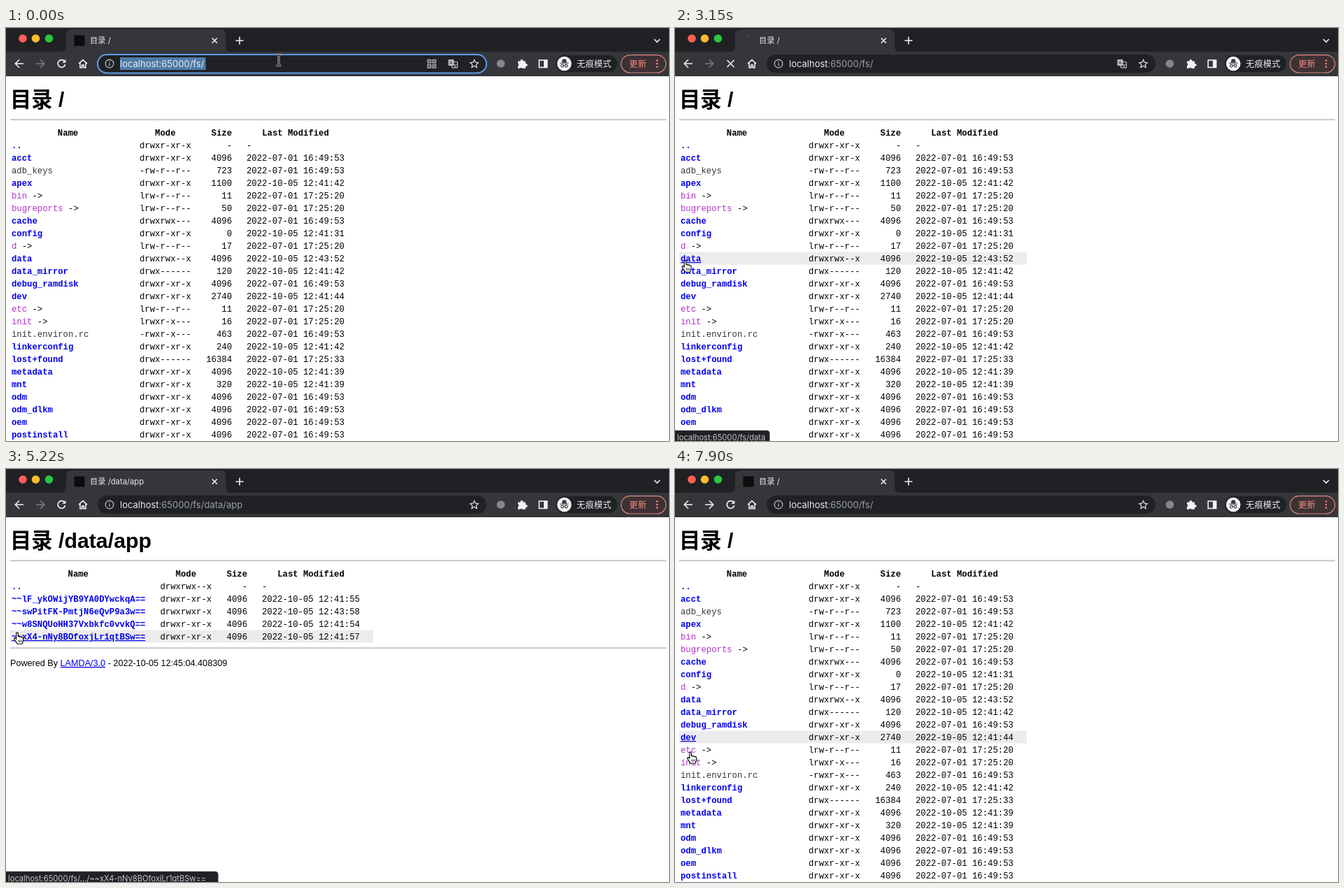
Animation of 948x591 px, one loop 8 s. Source, as an HTML page:

```html
<!DOCTYPE html>
<html lang="zh-CN">
<head>
<meta charset="utf-8">
<title>目录</title>
<style>
html, body { margin: 0; width: 100%; height: 100%; overflow: hidden; background: #fff; }
svg { display: block; width: 948px; height: 591px; }
text { white-space: pre; }
.ui { font-family: Inter, "Noto Sans CJK SC", "Noto Sans CJK", sans-serif; fill: #e8eaed; }
.doc { font-family: "Liberation Sans", "Noto Sans CJK SC", "Noto Sans CJK", sans-serif; }
.mono { font: 12.28px "Liberation Mono", monospace; }
.b { font-weight: bold; }
.dir { font-weight: bold; fill: #0000f0; }
.link { fill: #b030cc; }
.file { fill: #333; }
.icon { fill: none; stroke: #f1f3f4; stroke-width: 1.6; }
.soft { fill: none; stroke: #bdc1c6; stroke-width: 1.2; }
</style>
</head>
<body>
<svg id="stage" viewBox="0 0 948 591"></svg>
<script>
const LOOP = 8000, CHAR = 7.37, ROW = 18, TOP = 158;

// Rows: name mode size date time
const parse = s => s.trim().split('\n').map(line => {
  const [name, mode, size, date, time] = line.trim().split(' ');
  return { name, mode, size, date: time ? (date.length < 6 ? '2022-' : '') + date + ' ' + time : date };
});

const pages = {
  root: { path: '/', url: '', mode: 191, size: 323, date: 344, rows: parse(`
    .. drwxr-xr-x - -
    acct drwxr-xr-x 4096 07-01 16:49:53
    adb_keys -rw-r--r-- 723 07-01 16:49:53
    apex drwxr-xr-x 1100 10-05 12:41:42
    bin lrw-r--r-- 11 07-01 17:25:20
    bugreports lrw-r--r-- 50 07-01 17:25:20
    cache drwxrwx--- 4096 07-01 16:49:53
    config drwxr-xr-x 0 10-05 12:41:31
    d lrw-r--r-- 17 07-01 17:25:20
    data drwxrwx--x 4096 10-05 12:43:52
    data_mirror drwx------ 120 10-05 12:41:42
    debug_ramdisk drwxr-xr-x 4096 07-01 16:49:53
    dev drwxr-xr-x 2740 10-05 12:41:44
    etc lrw-r--r-- 11 07-01 17:25:20
    init lrwxr-x--- 16 07-01 17:25:20
    init.environ.rc -rwxr-x--- 463 07-01 16:49:53
    linkerconfig drwxr-xr-x 240 10-05 12:41:42
    lost+found drwx------ 16384 07-01 17:25:33
    metadata drwxr-xr-x 4096 10-05 12:41:39
    mnt drwxr-xr-x 320 10-05 12:41:39
    odm drwxr-xr-x 4096 07-01 16:49:53
    odm_dlkm drwxr-xr-x 4096 07-01 16:49:53
    oem drwxr-xr-x 4096 07-01 16:49:53
    postinstall drwxr-xr-x 4096 07-01 16:49:53`) },
  data: { path: '/data', url: 'data', mode: 213, size: 345, date: 366, rows: parse(`
    .. drwxr-xr-x - -
    adb drwx------ 4096 10-05 12:41:43
    anr drwxrwxr-x 4096 10-05 12:41:42
    apex drwxr-xr-x 4096 10-05 12:41:42
    app drwxrwx--x 4096 10-05 12:43:58
    app-asec drwx------ 4096 10-05 12:41:42
    app-ephemeral drwxrwx--x 4096 10-05 12:41:42
    app-lib drwxrwx--x 4096 10-05 12:41:42
    app-private drwxrwx--x 4096 10-05 12:41:42
    app-staging drwxr-x--x 4096 10-05 12:41:42
    backup drwx------ 4096 10-05 12:43:59
    bootchart drwxr-xr-x 4096 10-05 12:41:42
    cache drwxrwx--- 4096 10-05 12:41:42
    dalvik-cache drwxrwx--x 4096 10-05 12:41:44
    data drwxrwx--x 12288 10-05 12:43:59
    drm drwxrwx--- 4096 10-05 12:41:42
    fonts drwxrwx--x 4096 10-05 12:41:42
    gsi drwx------ 4096 10-05 12:41:43
    gsi_persistent_data -rw------- 1 10-05 12:41:43
    incremental drwxrwx--x 4096 10-05 12:41:42
    local drwxr-x--x 4096 10-05 12:41:42
    local.prop -rw-r--r-- 46 10-05 12:40:01
    lost+found drwxrwx--- 4096 1970-01-01 08:00:00
    media drwxrwx--- 4096 10-05 12:42:22`) },
  app: { path: '/data/app', url: 'data/app', mode: 220.5, size: 345, date: 366, footer: true, rows: parse(`
    .. drwxrwx--x - -
    ~~lF_ykOWijYB9YA0DYwckqA== drwxr-xr-x 4096 10-05 12:41:55
    ~~swPitFK-PmtjN6eQvP9a3w== drwxrwxr-x 4096 10-05 12:43:58
    ~~w8SNQUoHH37Vxbkfc0vvkQ== drwxr-xr-x 4096 10-05 12:41:54
    ~~xX4-nNy8BOfoxjLr1qtBSw== drwxr-xr-x 4096 10-05 12:41:57`) }
};

// Pointer stops: [tick, x, y]
const stops = [[0, 390, 46], [9, 390, 46], [10, 290, 142], [11, 160, 268], [12, 100, 269],
  [14, 34, 287], [16, 9, 289], [17, 11, 300], [19, 14, 328], [20, 14.5, 333], [23, 14.5, 333],
  [26, 16, 182], [27, 16, 184], [28, 16, 212], [29, 16, 215], [31, 16, 234], [35, 16, 234],
  [38, 22, 186], [39, 40, 86], [40, 32, 78], [42, 18, 61], [43, 15, 58], [50, 15, 58],
  [51, 17, 170], [52, 20, 352], [53, 22, 405]];

function pointer(k) {
  let i = stops.findIndex(s => s[0] >= k);
  if (i < 1) return stops[0].slice(1);
  const [a, x, y] = stops[i - 1], [b, u, v] = stops[i], f = (k - a) / (b - a);
  return [x + (u - x) * f, y + (v - y) * f];
}

const shortTicks = [29, 33, 37, 45, 51];
const tickStart = k => 150 * k - 10 * shortTicks.filter(s => s <= k).length;
function tickAt(t) {
  let k = 53;
  while (tickStart(k) > t) k--;
  return k;
}

const text = (x, y, s, cls = '', more = '') =>
  `<text x="${x}" y="${y}" class="${cls}" ${more}>${String(s).replace(/>/g, '&gt;')}</text>`;
const rect = (x, y, w, h, fill, more = '') =>
  `<rect x="${x}" y="${y}" width="${w}" height="${h}" fill="${fill}" ${more}/>`;
const circle = (x, y, r, fill, more = '') =>
  `<circle cx="${x}" cy="${y}" r="${r}" fill="${fill}" ${more}/>`;
const path = (d, cls = 'icon', more = '') => `<path d="${d}" class="${cls}" ${more}/>`;
const size = px => `font-size="${px}"`;
const END = 'text-anchor="end"', MID = 'text-anchor="middle"';

function hr(y) {
  return rect(6, y, 938, 1, '#8c8c8c') + rect(6, y + 1, 938, .8, '#e4e4e4');
}

function listing(page, hover) {
  const { mode, size: right, date, rows } = page;
  let out = text(6, 113, '目录 ' + page.path, 'doc b', size(30.3)) + hr(130.6);
  out += text(mode / 2 - 7, 154, 'Name', 'mono b', MID) + text(mode + 5 * CHAR, 154, 'Mode', 'mono b', MID)
    + text(right, 154, 'Size', 'mono b', END) + text(date + 9.5 * CHAR, 154, 'Last Modified', 'mono b', MID);
  rows.forEach((r, i) => {
    const y = TOP + 14 + ROW * i;
    const cls = { d: 'dir', l: 'link', '-': 'file' }[r.mode[0]];
    if (i === hover) out += rect(6, y - 13.5, date + 153, ROW, '#ececec');
    out += text(8, y, r.name, 'mono ' + cls, i === hover ? 'text-decoration="underline"' : '');
    if (cls === 'link') out += text(8 + (r.name.length + 1) * CHAR, y, '->', 'mono');
    out += text(mode, y, r.mode, 'mono') + text(right, y, r.size, 'mono', END) + text(date, y, r.date, 'mono');
  });
  if (page.footer) out += hr(255.6) + `<text x="6" y="282" class="doc" font-size="12.63">Powered By <tspan
    fill="#0000ee" text-decoration="underline">LAMDA/3.0</tspan> - 2022-10-05 12:45:04.408309</text>`;
  return out;
}

function toolbar(page, { focus, loading, stopIcon, translate, forward, backHover }) {
  let out = rect(0, 0, 948, 69, '#202124') + rect(0, 34, 948, 34.6, '#35363a')
    + path('M78 34Q86 34 86 26V10Q86 2 94 2H306Q314 2 314 10V26Q314 34 322 34Z', '', 'fill="#35363a"');
  [[24, '#ff5f57'], [42.5, '#febc2e'], [61.5, '#28c840']].forEach(([x, c]) => out += circle(x, 15, 5.8, c));
  out += loading ? circle(104.5, 12, .7, '#9aa0a6') : rect(97.5, 10.5, 15, 15, '#0c0c0d');
  out += text(120, 22, '目录 ' + page.path, 'ui', size(11.25));
  out += path('M294.8 14.5l7 7m0-7l-7 7', 'icon', 'stroke-width="1.4"')
    + path('M334 12.5v11M328.5 18h11', 'icon') + path('M927 16l4 4l4-4');

  // Navigation buttons
  if (backHover) out += circle(19, 51, 13, '#505155');
  out += path('M25 51H13.5M19 45.3L13.3 51L19 56.7');
  out += path('M43 51h11.5M49 45.3l5.7 5.7l-5.7 5.7', 'icon', forward ? '' : 'style="stroke:#7b7d81"');
  out += stopIcon ? path('M74.5 46l10 10m0-10l-10 10')
    : path('M83.6 47.6A5.3 5.3 0 1 0 84.7 52') + path('M85.4 44.8v5h-5z', '', 'fill="#f1f3f4"');
  out += path('M104 51l6-5.4l6 5.4M106 50v6.6h2.8v-3.5h2.4v3.5h2.8V50');

  // Address field
  out += focus ? rect(131, 38, 556, 26.4, '#202124', 'rx="13.2" stroke="#5f9be8" stroke-width="2"')
    : rect(131, 38, 556, 26, '#202124', 'rx="13"');
  out += circle(148, 51, 5.8, 'none', 'stroke="#bdc1c6" stroke-width="1.2"')
    + path('M148 50v4.3M148 47.3v1.4', 'soft');
  if (focus) {
    out += rect(163, 42, 122.5, 18, '#4f7aa8');
    [[603, 45.5], [610, 45.5], [603, 52.5], [610, 52.5]].forEach(([x, y]) =>
      out += rect(x, y, 4.5, 4.5, 'none', 'class="soft"') + rect(x + 1.5, y + 1.5, 1.5, 1.5, '#bdc1c6'));
  }
  out += `<text x="163" y="55.7" class="ui" font-size="13">localhost<tspan fill="${focus ? '#e8eaed' : '#9aa0a6'}">:65000/fs/${page.url}</tspan></text>`;
  if (translate) out += rect(637.5, 48.5, 8, 8.5, 'none', 'class="soft" rx="1"') + rect(632.5, 45, 8, 9, '#bdc1c6', 'rx="1"')
    + text(634, 52, 'A', 'ui', size(6.5) + ' style="fill:#202124"') + text(638.9, 55.8, '文', 'ui', size(6));
  out += path('M669.6 45.4l1.7 3.8l4.1.4l-3.1 2.8l.9 4.1l-3.6-2.2l-3.6 2.2l.9-4.1l-3.1-2.8l4.1-.4z', 'soft', 'style="stroke:#e0e2e5"');

  // Extensions, profile and update button
  out += circle(707.5, 51, 5.8, '#85878b');
  out += path('M732 47.5h3.6a2 2 0 1 1 3.8 0h3.6v3.5a2 2 0 1 1 0 3.8v3H738.6a2 2 0 0 0-3.6 0H732V54a2 2 0 0 0 0-3.7z', '', 'fill="#f1f3f4"');
  out += rect(762.3, 46, 11.4, 10.4, 'none', 'class="icon"') + rect(769, 46, 5, 10.4, '#f1f3f4');
  out += rect(786, 39, 88, 24, '#202124', 'rx="12"') + circle(798.3, 51, 10.3, '#f1f3f4')
    + path('M792 50.2h12.6M795.3 49l1-4h4l1 4z', '', 'fill="#35363a" stroke="#35363a"')
    + path('M797.3 53.8q1-.6 2 0', '', 'fill="none" stroke="#35363a"')
    + [795.5, 801.1].map(x => circle(x, 54, 1.9, 'none', 'stroke="#35363a" stroke-width="1.1"')).join('')
    + text(816, 55.6, '无痕模式', 'ui', size(12.4));
  out += rect(879.6, 38.6, 64, 25.4, '#3d3134', 'rx="12.7" stroke="#d98680" stroke-width="1.2"')
    + text(891, 55.6, '更新', 'ui', size(12.4) + ' style="fill:#f28b82"');
  [46.5, 51, 55.5].forEach(y => out += circle(931, y, 1.3, '#f28b82'));
  return out;
}

const shapes = {
  arrow: '<path d="M0 0V14.2L3.1 11.4L5.2 16.2L7.6 15.2L5.5 10.5H9.8Z" stroke="#fff"/>',
  hand: '<path d="M-1.3 1.2C-1.3-.6 1.3-.6 1.3 1.2V6C1.7 4.8 3.8 5 3.9 6.3C4.4 5.3 6.2 5.6 6.4 6.9C6.9 6.2 8.6 6.6 8.6 8V11C8.6 13 7.5 14 7.2 16.3H.2C-.6 14-3 12-4.3 9.6C-5 8-3 7-2.1 8.2L-1.3 9.3Z" fill="#fff" stroke="#000" stroke-width="1.1"/><path d="M2 10.5v3.3M4 10.5v3.3M6 10.5v3.3" stroke="#000" stroke-width=".8"/>',
  beam: [['#fff', 2.6], ['#000', 1.2]].map(([c, w]) => `<path d="M-3.2-8Q0-8 0-6Q0-8 3.2-8M0-6V6M-3.2 8Q0 8 0 6Q0 8 3.2 8M-1.8 3H1.8" fill="none" stroke="${c}" stroke-width="${w}"/>`).join('')
};

const rowAt = (page, y) => {
  const i = Math.floor((y - TOP) / ROW);
  return page.rows[i] ? i : -1;
};

function shapeAt(page, x, y) {
  if (y < 69) return x > 131 && x < 687 ? 'beam' : 'arrow';
  if (y > 75 && y < 116 && x > 36 && x < 200) return 'beam';
  const r = page.rows[rowAt(page, y)];
  return r && x > 7 && x < 8 + r.name.length * CHAR ? 'hand' : 'arrow';
}

const stage = document.getElementById('stage');

function draw(k) {
  const page = pages[k < 22 || k >= 50 ? 'root' : k < 34 || k >= 47 ? 'data' : 'app'];
  const [x, y] = pointer(k);
  // Row highlight trails the pointer by half a tick.
  let hover = rowAt(page, pointer(k - .5)[1]);
  if (k >= 47 && k <= 50) hover = page.rows.findIndex(r => r.name === (k < 50 ? 'app' : 'data'));

  const shape = shapeAt(page, x, y);
  let out = rect(0, 0, 948, 591, '#fff') + listing(page, hover) + toolbar(page, {
    focus: k < 6,
    loading: [6, 21, 22, 33, 46].includes(k),
    stopIcon: [21, 33, 46].includes(k),
    translate: k < 34,
    forward: k >= 47,
    backHover: k >= 42 && k <= 50
  });
  const status = k >= 17 && k <= 40;
  if (status) {
    const name = page.rows[hover < 0 ? 1 : hover].name;
    const dir = page.footer ? '.../' : page.url && page.url + '/';
    out += '<path id="bubble" fill="#202124" stroke="#4a4b4f" stroke-width=".6"/>'
      + text(3, 590, 'localhost:65000/fs/' + dir + name, 'ui', size(11.15) + ' id="status" style="fill:#c4c7cb"');
  }
  stage.innerHTML = out + `<g transform="translate(${x} ${y})">${shapes[shape]}</g>`;
  if (status) {
    const w = document.getElementById('status').getComputedTextLength() + (page.footer ? 20 : 9);
    document.getElementById('bubble').setAttribute('d', `M-1 576H${w - 4}Q${w} 576 ${w} 580V592H-1Z`);
  }
}

let last = -1;
const origin = performance.now();
function loop() {
  const k = tickAt((performance.now() - origin) % LOOP);
  if (k !== last) draw(last = k);
  requestAnimationFrame(loop);
}
loop();
</script>
</body>
</html>
```
